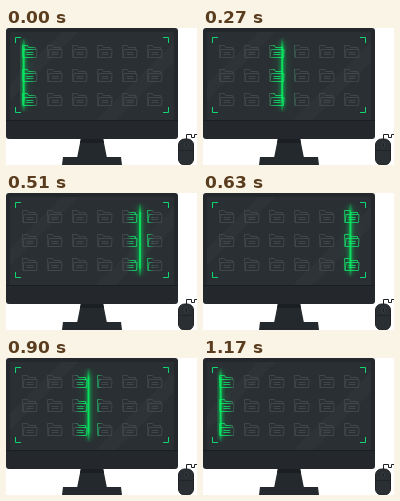
An HTML page that plays this animation: 191x137 px, repeating every 1200 ms.

```html
<!DOCTYPE html>
<html lang="en">
<head>
<meta charset="utf-8">
<title>Folder scan</title>
<style>
  html, body { margin: 0; width: 100%; height: 100%; overflow: hidden; background: #fff; }
  svg { display: block; width: 100vw; height: 100vh; }
  .sweep { animation: sweep 1.2s infinite; }
  @keyframes sweep {
    0% { transform: translateX(17.6px); animation-timing-function: steps(20, end); }
    50% { transform: translateX(154.6px); animation-timing-function: steps(19, end); }
    97.5%, 100% { transform: translateX(17.6px); }
  }
</style>
</head>
<body>
<svg viewBox="0 0 191 137" preserveAspectRatio="none">
  <defs>
    <linearGradient id="glow">
      <stop offset="0" stop-color="#00e85c" stop-opacity="0"/>
      <stop offset=".3" stop-color="#00e85c" stop-opacity=".07"/>
      <stop offset=".5" stop-color="#00e85c" stop-opacity=".5"/>
      <stop offset=".7" stop-color="#00e85c" stop-opacity=".07"/>
      <stop offset="1" stop-color="#00e85c" stop-opacity="0"/>
    </linearGradient>
    <linearGradient id="reach">
      <stop offset="0" stop-color="#fff" stop-opacity="0"/>
      <stop offset=".2" stop-color="#fff" stop-opacity=".8"/>
      <stop offset=".35" stop-color="#fff"/>
      <stop offset=".65" stop-color="#fff"/>
      <stop offset=".8" stop-color="#fff" stop-opacity=".8"/>
      <stop offset="1" stop-color="#fff" stop-opacity="0"/>
    </linearGradient>
    <linearGradient id="ends" x2="0" y2="1">
      <stop offset="0" stop-color="#fff" stop-opacity="0"/>
      <stop offset=".15" stop-color="#fff"/>
      <stop offset=".85" stop-color="#fff"/>
      <stop offset="1" stop-color="#fff" stop-opacity="0"/>
    </linearGradient>
    <clipPath id="area"><rect x="14" y="9" width="144" height="76"/></clipPath>
    <clipPath id="screen"><rect x="4" y="4" width="164" height="88"/></clipPath>
    <mask id="fade" maskUnits="userSpaceOnUse" x="0" y="0" width="191" height="137">
      <rect y="9" width="191" height="76" fill="url(#ends)"/>
    </mask>
    <mask id="near" maskUnits="userSpaceOnUse" x="0" y="0" width="191" height="137">
      <rect class="sweep" x="-14" y="9" width="28" height="76" fill="url(#reach)"/>
    </mask>
    <g id="folder">
      <path d="M1 12.5 .5 .5H5.5L6.5 2.5H13.5V4.5M1 12.5 2 4.5H15L14.5 12.5Z"/>
      <path d="M4.5 7.5H11.5M4.5 9.5H11.5"/>
    </g>
    <g id="row">
      <use href="#folder" x="16"/>
      <use href="#folder" x="41"/>
      <use href="#folder" x="66"/>
      <use href="#folder" x="91"/>
      <use href="#folder" x="116"/>
      <use href="#folder" x="141"/>
    </g>
    <g id="folders" fill="none" stroke-width=".9">
      <use href="#row" y="17"/>
      <use href="#row" y="41"/>
      <use href="#row" y="65"/>
    </g>
  </defs>

  <!-- monitor -->
  <path d="M75 110H97L101 130H71Z" fill="#24292d"/>
  <path d="M75 110H97L98 115H74Z" fill="#1b1f23"/>
  <path d="M57 129H115L116 137H56Z" fill="#24292d"/>
  <rect width="172" height="111" rx="3" fill="#24282c"/>
  <path d="M0 92.5H172" stroke="#1a1e22"/>
  <rect x="4" y="4" width="164" height="88" fill="#2a2f33"/>
  <g clip-path="url(#screen)" stroke="#fff" stroke-opacity=".018">
    <path d="M-2 70 72 -4" stroke-width="12"/>
    <path d="M96 96 174 18" stroke-width="14"/>
  </g>

  <use href="#folders" stroke="#44494d"/>
  <g mask="url(#near)"><use href="#folders" stroke="#0fd768"/></g>
  <path d="M9.5 15V9.5H15M157 9.5H162.5V15M162.5 79V84.5H157M15 84.5H9.5V79" fill="none" stroke="#10d470"/>

  <g clip-path="url(#area)"><g mask="url(#fade)"><g class="sweep">
    <rect x="-12" y="9" width="24" height="76" fill="url(#glow)"/>
    <rect x="-.9" y="10" width="1.8" height="74" rx=".9" fill="#0ae963"/>
  </g></g></g>

  <!-- mouse -->
  <path d="M180.5 112V106.5H185.5V109.5H188.5V106.5H191" fill="none" stroke="#1d2125"/>
  <rect x="172.5" y="111" width="15" height="26" rx="6" fill="#2a2f33" stroke="#1d2125"/>
  <path d="M173 122.5H187" stroke="#1d2125" stroke-width=".7"/>
  <rect x="179" y="114.5" width="2.4" height="5" rx="1.2" fill="#1d2125" stroke="#474c50" stroke-width=".6"/>
</svg>
</body>
</html>
```
